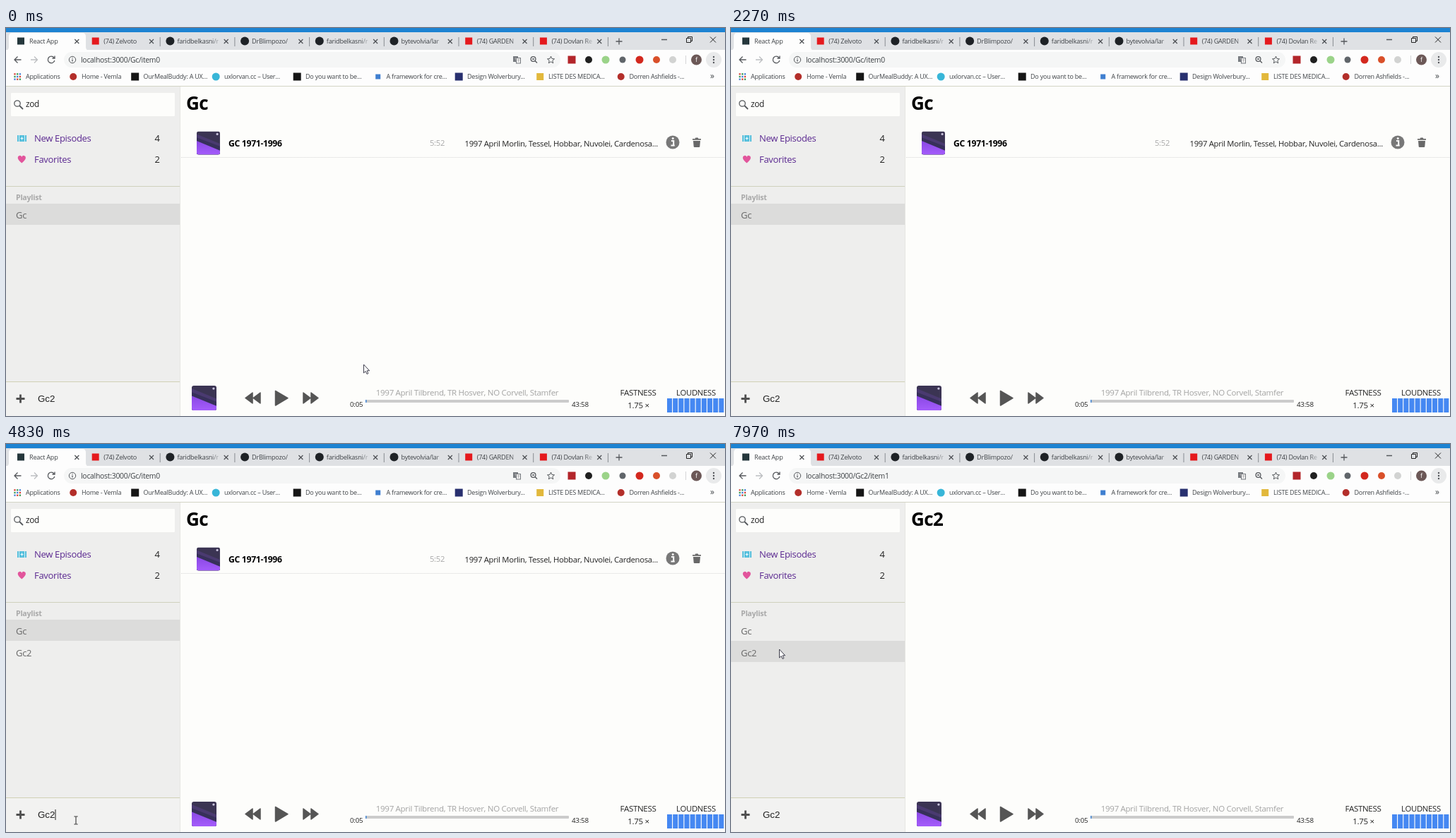
Recreate the animation shown at these times as an HTML page. Size 1018 by 550 pixels, loop 8 s.

```html
<!DOCTYPE html>
<html lang="en">
<head>
<meta charset="utf-8">
<title>Podcast playlists</title>
<style>
html, body { margin: 0; width: 100%; height: 100%; overflow: hidden; background: #fdfdfb; }
svg { display: block; width: 1018px; height: 550px; }
text { font-family: "Open Sans", "Noto Sans", sans-serif; letter-spacing: -.025em; white-space: pre; }
.input { font-family: "Liberation Sans", Arial, sans-serif; letter-spacing: 0; }
.line { fill: none; stroke: #55585c; stroke-width: 1.3; }
</style>
</head>
<body>
<svg viewBox="0 0 1018 550">
  <defs>
    <linearGradient id="fade"><stop offset="0" stop-color="#dfe1e4" stop-opacity="0"/><stop offset="1" stop-color="#dfe1e4"/></linearGradient>
    <clipPath id="round"><rect width="34" height="34" rx="3"/></clipPath>
    <linearGradient id="violet" x2="0" y2="1"><stop offset="0" stop-color="#8a48e4"/><stop offset="1" stop-color="#a45cfb"/></linearGradient>
    <g id="art" clip-path="url(#round)">
      <rect width="34" height="34" fill="#3b3453"/>
      <path d="M0 4 34 18V34H0z" fill="#4a3a70"/>
      <path d="M0 9 34 22V34H0z" fill="#37305a"/>
      <path d="M0 14 34 28V34H0z" fill="url(#violet)"/>
      <circle cx="30" cy="4" r="1.6" fill="#c9c4dd"/>
    </g>
    <path id="cross" d="M-3-3 3 3M3-3-3 3" fill="none" stroke="#4b4e52" stroke-width="1.2"/>
  </defs>

  <rect width="1018" height="550" fill="#fdfdfb"/>
  <!-- browser window -->
  <rect width="1018" height="7" fill="#1d83d2"/>
  <rect y="6" width="1018" height="26" fill="#dfe1e4"/>
  <path d="M0 32Q4 31 4 27V12Q4 7 9 7H108Q113 7 113 12V27Q113 31 117 32z" fill="#fdfdfd"/>
  <rect y="31" width="1018" height="51" fill="#fdfdfd"/>
  <rect x="82" y="34" width="703" height="22" rx="11" fill="#f5f6f6"/>
  <g id="chrome"></g>
  <path class="line" d="M868 14.500V23.500M863.500 19H872.500M928 16.500H936"/>
  <path d="M963.500 14.500H969.500V20.500H963.500zM965.500 14V12.500H971.500V18.500H970M997 12.500 1005 20.500M1005 12.500 997 20.500" fill="none" stroke="#222" stroke-width="1"/>
  <path class="line" d="M21.500 45H12M16.500 40.500 12 45 16.500 49.500"/>
  <path class="line" d="M35 45H44.500M40 40.500 44.500 45 40 49.500" style="stroke:#bcbec1"/>
  <path class="line" d="M68 42A4.800 4.800 0 1 0 68.800 46M69 39.500V43H65.500"/>
  <circle class="line" cx="94" cy="45" r="4.700" style="stroke-width:1"/>
  <path class="line" d="M94 44.500V47.500M94 42.300V43.300"/>
  <rect x="718" y="40" width="7" height="8" fill="#777b80"/>
  <rect x="722.500" y="42.500" width="6" height="7.500" fill="#eee" stroke="#777b80"/>
  <path d="M720 43H723M721.500 42V46M724 45H727.500M725.500 44V48" stroke="#aaa" fill="none" stroke-width=".8"/>
  <circle class="line" cx="746.500" cy="44" r="3.400"/>
  <path class="line" d="M749 46.500 752 49.500M745 44H748"/>
  <path class="line" d="M771.500 40 773 43.500 776.500 43.800 773.800 46.200 774.700 49.800 771.500 47.800 768.300 49.800 769.200 46.200 766.500 43.800 770 43.500z" style="stroke-width:1"/>
  <rect x="962" y="39" width="1" height="12" fill="#d4d5d6"/>
  <circle cx="977.500" cy="45" r="7.500" fill="#6c5857"/>
  <circle cx="1002" cy="45" r="11" fill="#e9eaeb"/>
  <g fill="#55585c"><circle cx="1002" cy="41" r="1.200"/><circle cx="1002" cy="45" r="1.200"/><circle cx="1002" cy="49" r="1.200"/></g>
  <rect y="82" width="1018" height="1" fill="#d3d4c5"/>

  <!-- sidebar -->
  <rect y="83" width="246" height="467" fill="#eeeeed"/>
  <rect y="502" width="246" height="48" fill="#f2f2f1"/>
  <rect x="246" y="83" width="1" height="467" fill="#e6e6e2"/>
  <rect x="7" y="92" width="232" height="33" rx="1" fill="#fdfdfb"/>
  <circle class="line" cx="16" cy="107" r="4.200"/>
  <path class="line" d="M19 110 24 115" style="stroke-width:1.800"/>
  <path d="M16 152H29V161H16z" fill="#55bfdc"/>
  <path d="M18.500 152V161M26.500 152V161" stroke="#d5eef5"/>
  <path d="M22.500 154.500V158.500M20.500 156.500H24.500" stroke="#eefaff" stroke-width="1.200"/>
  <path d="M22.300 191.500C19 188.500 16.700 186.500 16.700 184A2.900 2.900 0 0 1 22.300 182.700A2.900 2.900 0 0 1 27.900 184C27.900 186.500 25.600 188.500 22.300 191.500z" fill="#e2559c"/>
  <rect y="224" width="246" height="1" fill="#d0d1bd"/>
  <rect id="pick" y="249" width="246" height="30" fill="#dcdcdb"/>
  <rect y="501" width="246" height="1" fill="#d0d1b5"/>
  <path d="M20.500 519.500V531.500M14.500 525.500H26.500" stroke="#505050" stroke-width="2.800"/>

  <!-- playlist entry -->
  <g id="entry">
    <use href="#art" transform="translate(270 146.500) scale(.97)"/>
    <circle cx="944" cy="162" r="9.500" fill="#787878"/>
    <path d="M942 160H945.200V166M941.500 166.500H946.700" stroke="#fff" stroke-width="2" fill="none"/>
    <circle cx="944.200" cy="156.600" r="1.500" fill="#fff"/>
    <path d="M972 157H984V158.700H972zM975.500 157 976.300 155.500H979.700L980.500 157zM973 160H983L982.300 168Q982.200 169 981.200 169H974.800Q973.800 169 973.700 168z" fill="#686868"/>
    <path d="M248 183.500H1017" stroke="#d6d6d6" stroke-dasharray="1 1"/>
  </g>

  <!-- player -->
  <use href="#art" transform="translate(263 507) scale(1.030)"/>
  <g fill="#555" stroke="#555" stroke-linejoin="round" stroke-width="1.500">
    <path d="M349 517V532L339 524.500zM360 517V532L350 524.500z"/>
    <path d="M381.500 514.500V535L399 524.700z"/>
    <path d="M421 517V532L431 524.500zM432 517V532L442 524.500z"/>
  </g>
  <rect x="509" y="527" width="288" height="4" rx="1" fill="#cbcbcb"/>
  <rect x="509" y="527" width="1.500" height="4" fill="#4285d4"/>
  <g id="bars" fill="#4588f2"></g>
  <g id="labels"></g>

  <rect id="caret" x="69.500" y="518" width="1" height="15" fill="#222"/>
  <path id="arrow" d="M.5.500V12.500L3.200 10 5 14 6.900 13.200 5.100 9.300H8.600z" fill="#fff" stroke="#2b2b3a" stroke-width=".9"/>
  <path id="beam" d="M-2.500-5.500H-.7L0-5 .7-5.500H2.500M0-5V5M-2.500 5.500H-.7L0 5 .7 5.500H2.500" fill="none" stroke="#222"/>
</svg>
<script>
const $ = id => document.getElementById(id);
const label = (x, y, size, str, fill = '#222', extra = '') =>
  `<text x="${x}" y="${y}" font-size="${size}" fill="${fill}" ${extra}>${str}</text>`;
const dot = (x, y, r, fill) => `<circle cx="${x}" cy="${y}" r="${r}" fill="${fill}"/>`;
const box = (x, y, s, fill) => `<rect x="${x - s / 2}" y="${y - s / 2}" width="${s}" height="${s}" fill="${fill}"/>`;

// tabs: title, icon shape, icon colour
const tabs = [
  ['React App', box, '#25373c'],
  ['(74) Zelvoto', box, '#e5191d'],
  ['faridbelkasni/r', dot, '#1e2226'],
  ['DrBlimpozo/', dot, '#1e2226'],
  ['faridbelkasni/r', dot, '#1e2226'],
  ['bytevolvia/lar', dot, '#1e2226'],
  ['(74) GARDEN', box, '#e5191d'],
  ['(74) Dovlan Re', box, '#e5191d']
];
let out = '';
tabs.forEach(([title, shape, color], i) => {
  const x = 21 + 105.7 * i;
  out += shape(x, 18.5, shape === dot ? 6 : 10, color);
  out += label(x + (color === '#e5191d' ? 11.5 : 10) + (i ? 0 : 2), 22, 9.1, title, '#3f4347');
  if (i) {
    out += `<rect x="${x + 58}" y="10" width="14" height="18" fill="url(#fade)"/>`;
    out += `<rect x="${x + 72}" y="10" width="18" height="18" fill="#dfe1e4"/>`;
    out += `<rect x="${x + 91}" y="13" width="1" height="13" fill="#888c91"/>`;
  }
  out += `<use href="#cross" x="${x + 79.3}" y="19"/>`;
});

// bookmarks: left edge of the title, title, icon shape, size, icon colour
const marks = [
  [28, 'Applications'],
  [107, 'Home - Vemla', dot, 5, '#b32e2a'],
  [194.5, 'OurMealBuddy: A UX...', box, 11, '#151515'],
  [309, 'uxlorvan.cc – User...', dot, 5.5, '#38b6d8'],
  [424, 'Do you want to be...', box, 11, '#151515'],
  [538.5, 'A framework for cre...', box, 7, '#3f7fd0'],
  [653, 'Design Wolverbury...', box, 11, '#28306f'],
  [768, 'LISTE DES MEDICA...', box, 10, '#e2b83c'],
  [882.5, 'Dorren Ashfields -...', dot, 5, '#b32e2a']
];
const grid = ['#d9463b', '#3b9b57', '#4680d8'];
marks.forEach(([x, title, shape, size, color]) => {
  if (shape) out += shape(x - 11.8, 69, size, color);
  else for (let k = 0; k < 9; k++) out += box(12.5 + k % 3 * 3.7, 65.3 + (k / 3 | 0) * 3.7, 2.3, grid[(k + (k / 3 | 0)) % 3]);
  out += label(x, 72, 9, title, '#3f4347');
});
out += label(997, 72, 12, '»', '#3f4347');

// extension buttons
out += box(801, 45, 11, '#b3262b') + dot(825, 45, 5, '#202020') + dot(849, 45, 5.5, '#9bd389') +
  dot(873, 45, 4.5, '#60656a') + dot(897, 45, 5.5, '#d3281e') + dot(921, 45, 5, '#d9502a') + dot(944, 45, 5, '#d2d3d2');
out += label(106, 48.5, 10.4, '', '#3c4044', 'id="url"');
$('chrome').innerHTML = out;

const bold = 'font-weight="700"', mid = 'text-anchor="middle"';
$('labels').innerHTML =
  label(977.5, 48, 9, 'f', '#fff', mid) +
  label(28, 112, 11.8, 'zod') +
  label(40, 161, 13, 'New Episodes', '#5a2890') + label(210.5, 161, 13, '4') +
  label(40, 191, 13, 'Favorites', '#5a2890') + label(210.5, 191, 13, '2') +
  label(14, 243.5, 10.6, 'Playlist', '#a9a9a9', bold) +
  label(14, 270, 13, 'Gc', '#686868') +
  label(14, 300.5, 13, 'Gc2', '#686868', 'id="added"') +
  label(45, 530, 13.33, 'Gc2', '#222', 'class="input"') +
  label(255, 116, 26, '', '#000', 'id="head" ' + bold) +
  label(653, 520.5, 11.5, '1997 April Tilbrend, TR Hosver, NO Corvell, Stamfer', '#a3a3a3', mid) +
  label(487, 537, 9.7, '0:05') + label(801, 537, 9.8, '43:58') +
  label(895, 520.5, 11.5, 'FASTNESS', '#222', mid) + label(895.5, 538.5, 11.5, '1.75 ×', '#222', mid) +
  label(977, 520.5, 11.3, 'LOUDNESS', '#222', mid);
$('entry').insertAdjacentHTML('beforeend',
  label(315, 167.5, 12.2, 'GC 1971-1996', '#000', bold) +
  label(600, 167, 11.2, '5:52', '#a8a8a8') +
  label(649.5, 167.5, 11.26, '1997 April Morlin, Tessel, Hobbar, Nuvolei, Cardenosa...'));
for (let i = 0; i < 10; i++)
  $('bars').innerHTML += `<rect x="${936 + 8.15 * i}" y="525" width="7" height="20"/>`;

// pointer path: ms, x, y
const path = [
  [0, 506, 476.5], [1600, 506, 476.5], [1700, 480, 552], [2430, 150, 552],
  [2700, 99, 538], [3270, 99, 538], [3500, 99, 533.5], [4830, 99, 533.5],
  [4950, 106, 470], [5120, 104, 320], [5250, 90, 221], [5350, 80, 232],
  [5570, 68, 290.5], [8000, 68, 290.5]
];
const caretOn = [[2750, 3290], [3820, 4930], [5440, 5970]];
const added = 4100, opened = 6170, loop = 8000;
const show = (id, on) => $(id).setAttribute('visibility', on ? 'visible' : 'hidden');
const ease = p => p * p * (3 - 2 * p);

function pointer(t) {
  const i = path.findIndex(k => k[0] > t);
  const [t0, x0, y0] = path[i - 1], [t1, x1, y1] = path[i];
  const p = ease((t - t0) / (t1 - t0));
  return [x0 + (x1 - x0) * p, y0 + (y1 - y0) * p];
}

function draw(t) {
  const [x, y] = pointer(t);
  const typing = x < 246 && y > 502;
  const away = t >= 1700 && t < 2430;
  show('arrow', !typing && !away);
  show('beam', typing && !away);
  for (const id of ['arrow', 'beam']) $(id).setAttribute('transform', `translate(${x} ${y})`);
  show('caret', caretOn.some(([a, b]) => t >= a && t < b));
  show('added', t >= added);
  const second = t >= opened;
  show('entry', !second);
  $('pick').setAttribute('y', second ? 279 : 249);
  $('head').textContent = second ? 'Gc2' : 'Gc';
  $('url').textContent = 'localhost:3000/' + (second ? 'Gc2/item1' : 'Gc/item0');
}

const start = performance.now();
function tick() {
  draw((performance.now() - start) % loop);
  requestAnimationFrame(tick);
}
tick();
</script>
</body>
</html>
```
